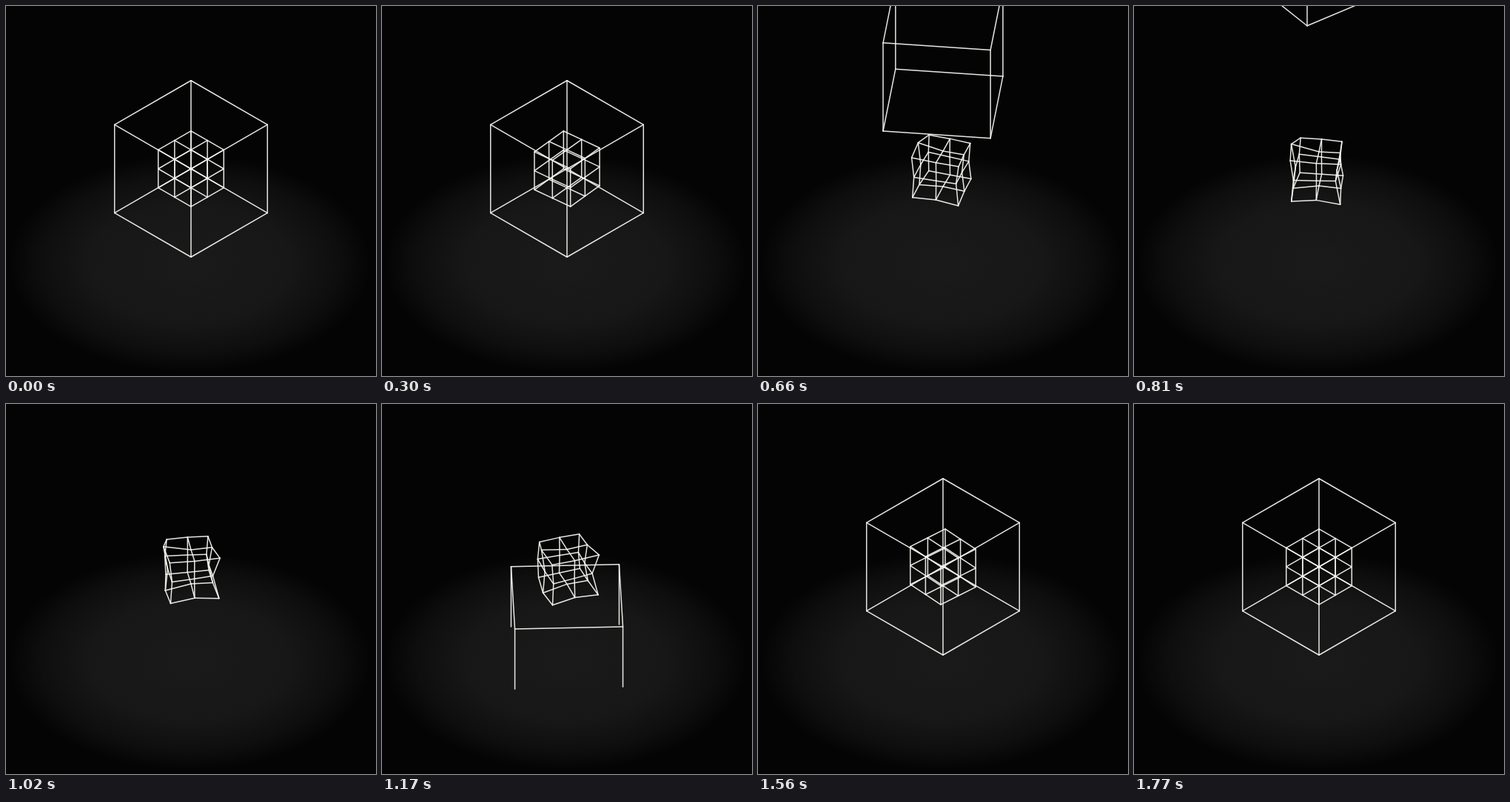
Write an HTML page with a canvas that moves like this. It is 500 px wide and 500 px high and loops after 1.8 s.

```html
<!DOCTYPE html>
<html lang="en">
<head>
<meta charset="utf-8">
<title>Wire cubes</title>
<style>
html, body { margin: 0; width: 100%; height: 100%; overflow: hidden; background: #040404; }
canvas { display: block; width: 500px; height: 500px; }
</style>
</head>
<body>
<canvas id="stage" width="500" height="500"></canvas>
<script>
const ctx = document.getElementById('stage').getContext('2d');
const LOOP = 1800, STEP = 30, CX = 250, CY = 220;
const FLAT = Math.sqrt(1 / 3);
const BIG = { r: 103.3, h: 119.2 };
const SMALL = { r: 44.3, h: 51.2 };
const { sin, cos, abs, PI } = Math;
const rad = PI / 180;
const clamp = v => Math.min(1, Math.max(0, v));
const mix = (a, b, k) => a + (b - a) * k;
const along = (a, b, k) => [mix(a[0], b[0], k), mix(a[1], b[1], k)];
const ease = (t, from, to) => (1 - cos(PI * clamp((t - from) / (to - from)))) / 2;

function line(a, b) {
  ctx.beginPath();
  ctx.moveTo(a[0], a[1]);
  ctx.lineTo(b[0], b[1]);
  ctx.stroke();
}

function floor() {
  ctx.fillStyle = '#040404';
  ctx.fillRect(0, 0, 500, 500);
  ctx.save();
  ctx.translate(248, 348);
  ctx.scale(1, 0.6);
  const g = ctx.createRadialGradient(0, 0, 0, 0, 0, 245);
  g.addColorStop(0, '#1a1a1a');
  g.addColorStop(0.55, '#171717');
  g.addColorStop(0.82, '#0e0e0e');
  g.addColorStop(1, '#040404');
  ctx.fillStyle = g;
  ctx.fillRect(-250, -250, 500, 500);
  ctx.restore();
}

// Corners of the large cube's top, front corner first.
function corners(shift, turn) {
  return [0, 1, 2, 3].map(i => {
    const a = (turn + 90 * i) * rad;
    return [CX + BIG.r * sin(a), CY - BIG.h / 2 + shift + BIG.r * FLAT * cos(a)];
  });
}

// Flies off the top, then rises again while its edges are drawn on.
function bigCube(t) {
  let shift = 0, turn = 0, rim = 4, drop = BIG.h, base = 1;
  if (t > 329 && t < 960) {
    shift = -60 * ((t - 329) / 211) ** 2;
    turn = -0.26 * shift;
  } else if (t >= 960 && t < 1454) {
    shift = 100 * ((1454 - t) / 284) ** 3;
    turn = -0.43 * shift;
    rim = Math.max(0, (t - 1072.5) / 7.5);
    drop = Math.min(BIG.h, 50 + (t - 1110) * 0.52) * clamp((t - 1080) / 30);
    base = clamp((t - 1245) / 75);
  }
  if (rim <= 0) return;
  const top = corners(shift, turn);
  const low = top.map(p => [p[0], p[1] + drop]);
  for (let n = 0; n < 4; n++) {
    const a = 3 - n, b = (a + 3) % 4;
    const k = clamp(rim - n);
    if (k > 0) line(top[a], along(top[a], top[b], k));
    if (drop > 0) line(top[n], low[n]);
    if (base > 0) line(low[a], along(low[a], low[b], base));
  }
}

// Smooth bumps round each level; the waist is pinched.
function bump(a, level) {
  const edge = abs(level);
  const wave = -0.09 * sin(a) + edge * (0.05 * sin(2 * a) + 0.07 * cos(3 * a));
  const waist = (1 - edge) * (0.1 + 0.08 * cos(a));
  return wave * (1 - level / 4) - waist;
}

function smallCube(t) {
  const turn = 90 * ease(t, 0, LOOP);
  const warp = ease(t, 450, 810) * (1 - ease(t, 1100, 1380));

  const point = (level, i) => {
    const local = 45 * i * rad, a = local + turn * rad;
    const r = SMALL.r * (i % 2 ? Math.SQRT1_2 : 1);
    const s = 1 + warp * bump(local, level);
    return [CX + r * sin(a) * s, CY + (level * SMALL.h / 2 + r * FLAT * cos(a)) * s];
  };
  const cap = level => [CX, CY + level * SMALL.h / 2 * (1 - 0.1 * warp)];

  for (let i = 0; i < 8; i++) {
    for (let level = -1; level <= 1; level++) {
      const p = point(level, i);
      line(p, point(level, i + 1));
      if (level < 1) line(p, point(level + 1, i));
      if (level && i % 2) line(p, cap(level));
    }
  }
}

function draw(now) {
  const t = Math.floor((now % LOOP) / STEP) * STEP;
  floor();
  ctx.lineCap = 'round';
  ctx.lineWidth = 1.5;
  ctx.strokeStyle = 'rgba(248,248,243,0.93)';
  bigCube(t);
  smallCube(t);
}

let start = null;
function tick(now) {
  if (start === null) start = now;
  draw(Math.max(0, now - start));
  requestAnimationFrame(tick);
}
draw(0);
requestAnimationFrame(tick);
</script>
</body>
</html>
```
